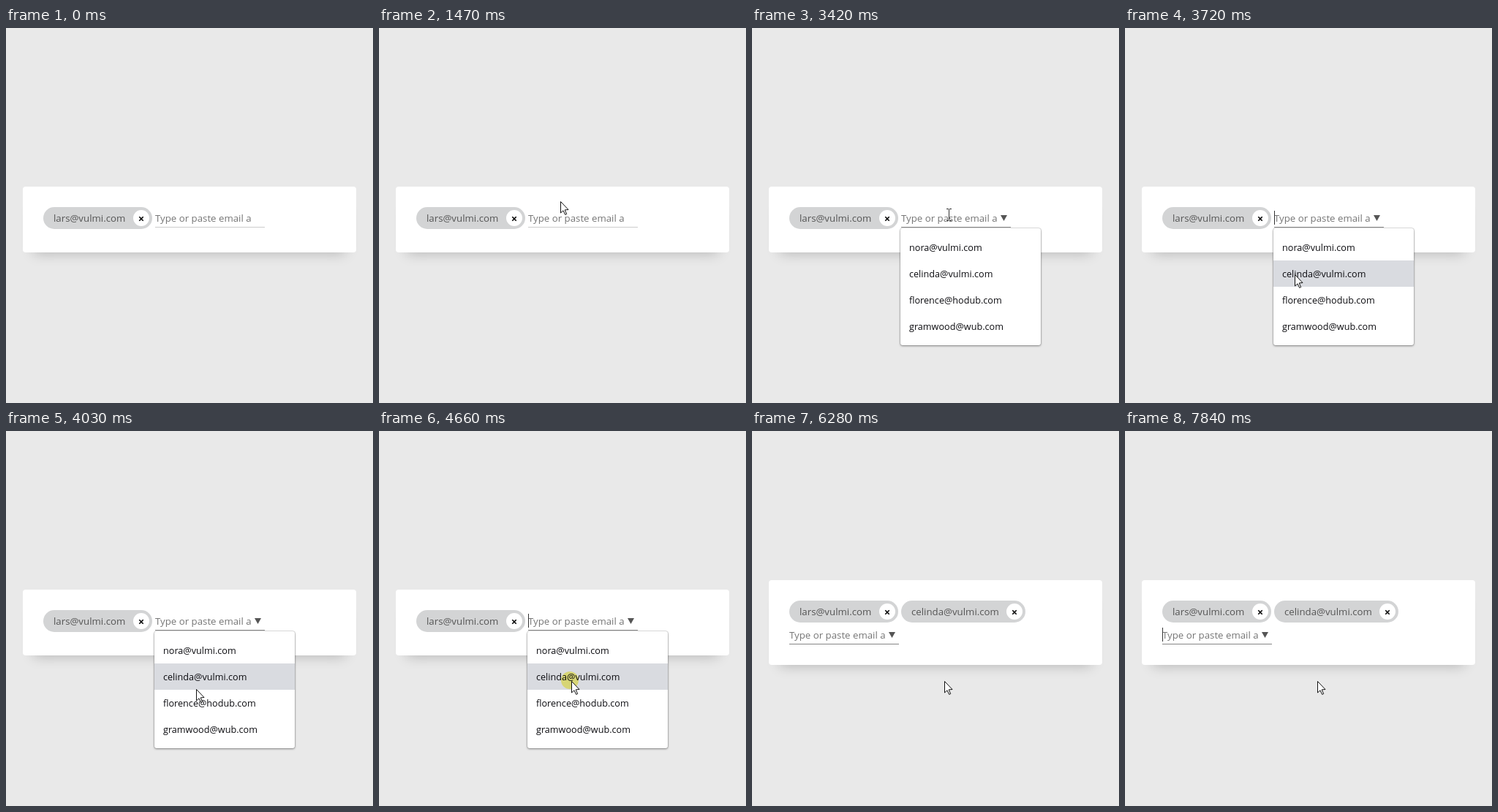
Animation, 502 px wide and 513 px high, one loop 8000 ms. Source, as an HTML page with a canvas:

```html
<!DOCTYPE html>
<html lang="en">
<head>
<meta charset="utf-8">
<title>Email chips input</title>
<style>
  html, body { margin: 0; width: 100%; height: 100%; overflow: hidden; background: #e9e9e9; }
  canvas { display: block; width: 502px; height: 513px; }
</style>
</head>
<body>
<canvas id="stage"></canvas>
<script>
const W = 502, H = 513, LOOP = 8000;
const canvas = document.getElementById('stage');
const ctx = canvas.getContext('2d');
const dpr = window.devicePixelRatio || 1;
canvas.width = W * dpr;
canvas.height = H * dpr;

const FIELD_FONT = '13.25px "Open Sans", "Noto Sans", sans-serif';
const LIST_FONT = '500 12.65px "Open Sans", "Noto Sans", sans-serif';
const HINT = 'Type or paste email a';
const FIRST = 'lars@vulmi.com';
const PICKED = 'celinda@vulmi.com';
const OPTIONS = ['nora@vulmi.com', PICKED, 'florence@hodub.com', 'gramwood@wub.com'];

const OPEN = 2400, PRESS = 4660, PICK = 4740, COMMIT = 5730;
const BLINK = 525, STEP = 77, ROW = 36;

// The pointer enters from ORIGIN and eases to each target in a few steps.
const ORIGIN = { x: 437, y: 508 };
const MOVES = [
  { at: 380, steps: 11, x: 250, y: 268 },
  { at: 1460, steps: 2, x: 248, y: 233 },
  { at: 1770, steps: 4, x: 269, y: 255 },
  { at: 3640, steps: 2, x: 232, y: 337 },
  { at: 3794, steps: 4, x: 260, y: 353 },
  { at: 4102, steps: 4, x: 263, y: 342 }
];

const easeOut = p => 1 - (1 - p) ** 3;

function pointerAt(t) {
  if (t < MOVES[0].at) return null;
  let { x, y } = ORIGIN;
  for (const move of MOVES) {
    if (t < move.at) break;
    const step = Math.min(move.steps, Math.floor((t - move.at) / STEP) + 1);
    const p = easeOut(step / move.steps);
    x += (move.x - x) * p;
    y += (move.y - y) * p;
  }
  return { x: Math.round(x), y: Math.round(y) };
}

// Each input event restarts the blink.
function caretOn(t) {
  if (t < OPEN) return false;
  const since = t - (t >= COMMIT ? COMMIT : t >= PICK ? PICK : OPEN);
  return Math.floor(since / BLINK) % 2 === 0;
}

function rounded(x, y, w, h, r, fill) {
  ctx.fillStyle = fill;
  ctx.beginPath();
  ctx.roundRect(x, y, w, h, r);
  ctx.fill();
}

function rect(x, y, w, h, fill) {
  ctx.fillStyle = fill;
  ctx.fillRect(x, y, w, h);
}

function disc(x, y, r, fill) {
  ctx.fillStyle = fill;
  ctx.beginPath();
  ctx.arc(x, y, r, 0, Math.PI * 2);
  ctx.fill();
}

function polygon(points) {
  ctx.beginPath();
  points.forEach(([x, y]) => ctx.lineTo(x, y));
  ctx.closePath();
}

function label(text, x, y, fill, font = FIELD_FONT) {
  ctx.font = font;
  ctx.fillStyle = fill;
  ctx.fillText(text, x, y);
}

function withShadow(color, blur, dy, draw) {
  ctx.save();
  ctx.shadowColor = color;
  ctx.shadowBlur = blur * dpr;
  ctx.shadowOffsetY = dy * dpr;
  draw();
  ctx.restore();
}

function drawCard(y, h) {
  withShadow('rgba(0,0,0,.23)', 17, 16, () => rect(38, y + 15, 426, h - 30, '#000'));
  rounded(23, y, 456, h, 4, '#fff');
}

function drawChip(text, x, y, w) {
  rounded(x, y, w, 30, 15, '#d3d4d5');
  label(text, x + 14, y + 20, '#555');
  const cx = x + w - 15, cy = y + 16;
  disc(cx, cy - 1, 11, '#fff');
  ctx.strokeStyle = '#000';
  ctx.lineWidth = 1.6;
  ctx.beginPath();
  for (const side of [-2.7, 2.7]) {
    ctx.moveTo(cx - side, cy - 2.7);
    ctx.lineTo(cx + side, cy + 2.7);
  }
  ctx.stroke();
}

function drawField(x, y, value, focused, marker, caret) {
  label(value || HINT, x, y + 15, value ? '#555' : '#757575');
  rect(x, y + 22, 150, 1, focused ? '#858585' : '#ccc');
  if (marker) {
    ctx.fillStyle = '#555';
    polygon([[x + 136, y + 6], [x + 145, y + 6], [x + 140.5, y + 14]]);
    ctx.fill();
  }
  if (caret) rect(value ? x + 120 : x, y, 1, 19, '#333');
}

function drawList(items, active) {
  const h = items.length * ROW + 16;
  withShadow('rgba(0,0,0,.4)', 3, 1, () => rounded(203, 274, 192, h, 3, '#fff'));
  ctx.strokeStyle = 'rgba(0,0,0,.1)';
  ctx.lineWidth = 1;
  ctx.beginPath();
  ctx.roundRect(202.5, 273.5, 193, h + 1, 3.5);
  ctx.stroke();
  items.forEach((item, i) => {
    const y = 282 + i * ROW;
    if (i === active) rect(203, y, 192, ROW, '#d9dbe0');
    label(item, 215, y + 23, '#0c0c10', LIST_FONT);
  });
}

function drawArrow(x, y) {
  ctx.save();
  ctx.translate(x, y);
  polygon([[.5, .5], [.5, 16], [4, 12.8], [6.7, 18.4], [8.7, 17.5], [6.2, 11.9], [11, 11.5]]);
  ctx.fillStyle = '#fff';
  ctx.fill();
  ctx.strokeStyle = '#111';
  ctx.lineWidth = 1;
  ctx.stroke();
  ctx.restore();
}

function drawBeam(x, y) {
  rect(x, y - 7, 1, 15, '#333');
  for (const edge of [y - 8, y + 8]) {
    rect(x - 3, edge, 3, 1, '#333');
    rect(x + 1, edge, 3, 1, '#333');
  }
}

function drawClick(x, y) {
  ctx.save();
  ctx.globalCompositeOperation = 'multiply';
  disc(x - 2, y - 1, 12, '#fdf885');
  ctx.restore();
}

function draw(t) {
  const focused = t >= OPEN, picked = t >= PICK, done = t >= COMMIT;
  const pointer = pointerAt(t);
  const overField = pointer && !done && pointer.x >= 204 && pointer.x < 354 &&
    pointer.y >= 247 && pointer.y < 274;

  ctx.setTransform(dpr, 0, 0, dpr, 0, 0);
  rect(0, 0, W, H, '#e9e9e9');

  if (done) {
    drawCard(204, 116);
    drawChip(FIRST, 51, 232, 149);
    drawChip(PICKED, 204, 232, 170);
    drawField(51, 269, '', true, true, caretOn(t));
  } else {
    drawCard(217, 90);
    drawChip(FIRST, 51, 245, 149);
    drawField(204, 250, picked ? PICKED : '', focused, focused || overField, caretOn(t));
    if (picked) drawList([PICKED], -1);
    else if (focused) drawList(OPTIONS, Math.floor((pointer.y - 282) / ROW));
  }

  if (!pointer) return;
  const clicking = (t >= OPEN && t < OPEN + 70) || (t >= PRESS && t < PICK);
  if (clicking) drawClick(pointer.x, pointer.y);
  (overField ? drawBeam : drawArrow)(pointer.x, pointer.y);
}

const start = performance.now();
function tick() {
  draw((performance.now() - start) % LOOP);
  requestAnimationFrame(tick);
}
tick();
</script>
</body>
</html>
```
